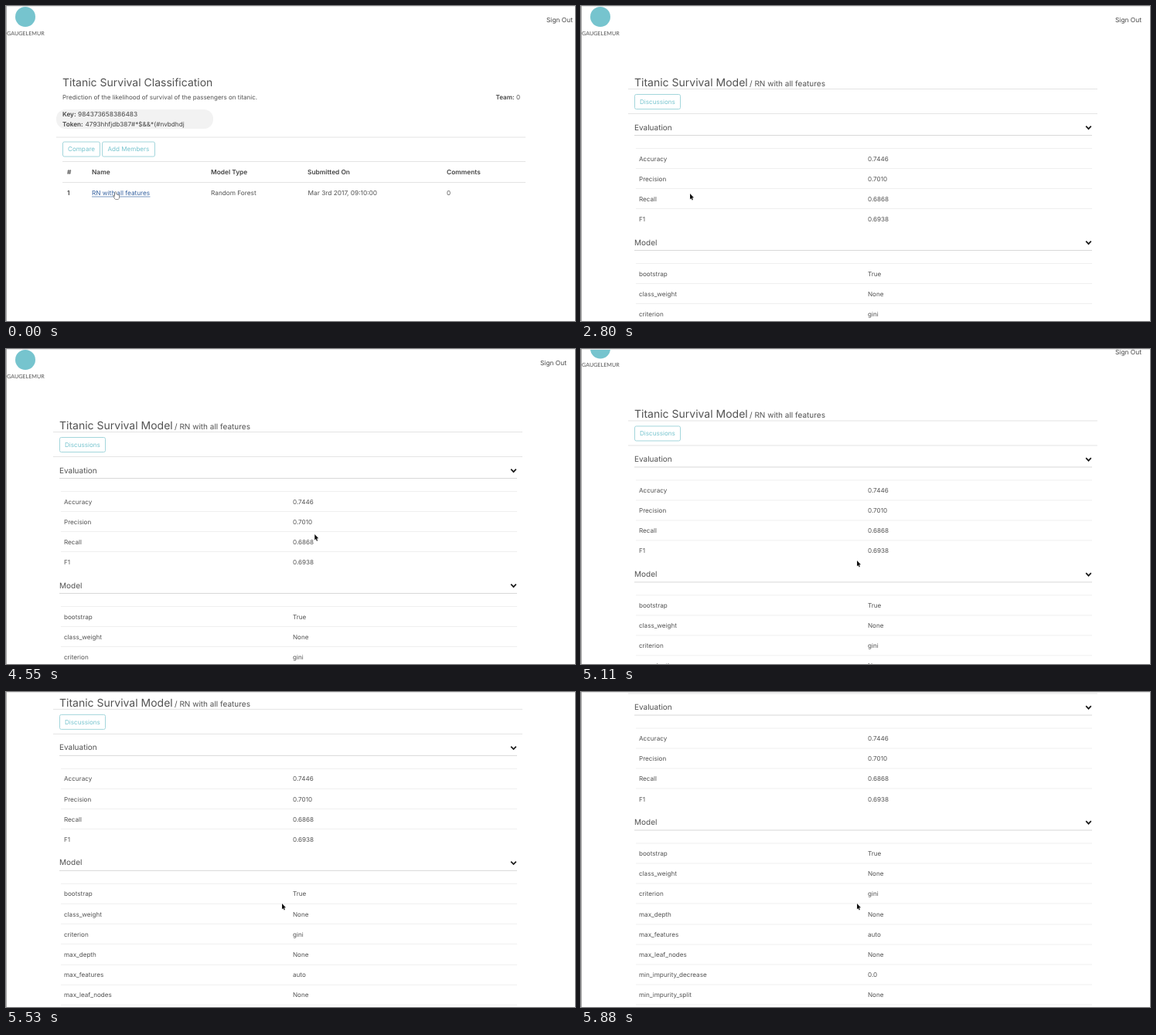
Recreate the animation shown at these times as an HTML page with a canvas. Size 736 by 408 pixels, loop 5.95 s.

```html
<!DOCTYPE html>
<html lang="en">
<head>
<meta charset="utf-8">
<title>Model tracker</title>
<style>
  html, body { margin: 0; width: 100%; height: 100%; overflow: hidden; background: #fff; }
  canvas { display: block; }
</style>
</head>
<body>
<canvas id="stage" width="736" height="408"></canvas>
<script>
const ctx = document.getElementById('stage').getContext('2d');
const LOOP = 5950, STEP = 70, PAGE_CHANGE = 2730;
const INK = '#525252', DARK = '#454545', TEAL = '#76c4ce', RULE = '#e4e4e4', FAINT = '#efefef';
const ROW = 26.13;

const METRICS = [['Accuracy', '0.7446'], ['Precision', '0.7010'], ['Recall', '0.6868'], ['F1', '0.6938']];
const PARAMS = [['bootstrap', 'True'], ['class_weight', 'None'], ['criterion', 'gini'],
  ['max_depth', 'None'], ['max_features', 'auto'], ['max_leaf_nodes', 'None'],
  ['min_impurity_decrease', '0.0'], ['min_impurity_split', 'None']];

const progress = (t, from, to) => Math.min(1, Math.max(0, (t - from) / (to - from)));
const mix = (a, b, k) => a + (b - a) * k;
const easeInOut = u => u < 0.5 ? 4 * u ** 3 : 1 - 4 * (1 - u) ** 3;
const easeOut = u => 1 - (1 - u) ** 2;
const bezier = (a, b, c, d, u) =>
  a * (1 - u) ** 3 + 3 * b * u * (1 - u) ** 2 + 3 * c * u * u * (1 - u) + d * u ** 3;

// Two flicks of the wheel
function scrollAt(t) {
  return 56.8 * easeInOut(progress(t, 4970, 5320)) + 80.7 * easeInOut(progress(t, 5418, 5670));
}

// A straight run up to the right, then a hook back down
function pointerAt(t) {
  if (t < 4340) {
    const k = easeInOut(progress(t, 3710, 4340));
    return [mix(141, 358, k), mix(243, 174, k)];
  }
  const u = easeOut(progress(t, 4340, 4970));
  return [bezier(358, 410, 417, 357, u), bezier(174, 170, 296, 274, u)];
}

// y is the middle of the capitals; returns the width
function text(str, x, y, size = 8.15, color = INK, weight = 400, family = 'Inter') {
  ctx.font = `${weight} ${size}px ${family}, sans-serif`;
  ctx.fillStyle = color;
  ctx.fillText(str, x, y + size * 0.36);
  return ctx.measureText(str).width;
}

// Letter by letter, so that the font does not swap in contextual symbols
function plainText(str, x, y, size, color) {
  for (const ch of str) x += text(ch, x, y, size, color);
}

const bold = (str, x, y, size = 8.35) => text(str, x, y, size, DARK, 600);

function rule(x0, x1, y, color = RULE) {
  ctx.fillStyle = color;
  ctx.fillRect(x0, y, x1 - x0, 1);
}

function button(label, x, y, w, textX) {
  ctx.beginPath();
  ctx.roundRect(x + 0.5, y + 0.5, w - 1, 19, 2);
  ctx.strokeStyle = '#a3d6dc';
  ctx.lineWidth = 1;
  ctx.stroke();
  text(label, textX, y + 10, 8.1, TEAL);
}

function polygon(points) {
  ctx.beginPath();
  points.forEach(([x, y]) => ctx.lineTo(x, y));
}

function header(signOutX) {
  ctx.fillStyle = TEAL;
  ctx.beginPath();
  ctx.arc(25, 14, 13, 0, Math.PI * 2);
  ctx.fill();
  text('GAUGELEMUR', 1, 35, 7.15, INK, 400, 'Lato');
  text('Sign Out', signOutX, 18.3, 8.4, DARK);
}

function projectPage() {
  header(699);
  text('Titanic Survival Classification', 73, 99, 14);
  text('Prediction of the likelihood of survival of the passengers on titanic.', 73, 118.5, 8);
  bold('Team:', 633.5, 118.5, 8.1);
  text('0', 660, 118.5);

  ctx.fillStyle = '#f2f2f2';
  ctx.beginPath();
  ctx.roundRect(65, 134, 203, 25, 12);
  ctx.fill();
  bold('Key:', 73, 140, 8.2);
  text('984373658386483', 93, 140, 8.35, DARK);
  bold('Token:', 73, 153, 8.2);
  plainText('4793hhfjdb387#*$&&*(#nvbdhdj', 102.5, 153, 8.2, DARK);

  rule(65, 672, 169.5);
  button('Compare', 73, 175.5, 49, 80);
  button('Add Members', 124, 175.5, 69, 131.5);

  rule(73, 672, 201);
  rule(73, 672, 228);
  const columns = [['#', 79], ['Name', 111], ['Model Type', 265], ['Submitted On', 390], ['Comments', 570]];
  columns.forEach(([label, x]) => bold(label, x, 215.3));
  bold('1', 79, 241.8);
  text('RN with all features', 111, 241.8, 8.22, '#34619f');
  rule(111, 186.5, 246.5, '#7898c0');
  text('Random Forest', 265, 241.8, 8.25);
  text('Mar 3rd 2017, 09:10:00', 390.5, 241.8, 8.32);
  text('0', 570, 241.8);
}

function section(title, y, rows) {
  text(title, 69, y, 10);
  polygon([[653.2, y - 1.3], [656.5, y + 2.2], [659.8, y - 1.3]]);
  ctx.strokeStyle = '#1a1a1a';
  ctx.lineWidth = 1.7;
  ctx.stroke();
  rule(69, 661, y + 10, '#d8d8d8');
  rows.forEach(([name, value], i) => {
    const rowY = y + 40.7 + i * ROW;
    rule(71, 661, Math.round(y + 27 + i * ROW), FAINT);
    text(name, 75, rowY, 8.1);
    text(value, 371, rowY, 8.1);
  });
}

function modelPage(scroll) {
  ctx.save();
  ctx.translate(0, -scroll);
  header(691);
  text('Titanic Survival Model', 69, 99, 14);
  text('/ RN with all features', 218, 100.3, 10);
  rule(61, 668, 107);
  button('Discussions', 69, 114, 60, 76);
  rule(61, 668, 139);
  section('Evaluation', 157, METRICS);
  section('Model', 306, PARAMS);
  rule(71, 661, 542, FAINT);
  ctx.restore();
}

function cursor([x, y], points, fill, stroke) {
  ctx.save();
  ctx.translate(x, y);
  polygon(points);
  ctx.closePath();
  ctx.lineJoin = 'round';
  ctx.lineWidth = 1;
  ctx.strokeStyle = stroke;
  ctx.stroke();
  ctx.fillStyle = fill;
  ctx.fill();
  ctx.restore();
}

const ARROW = [[0, 0], [0, 7.4], [1.6, 6], [2.7, 8.6], [3.9, 8.1], [2.8, 5.5], [5, 5.3]];
const HAND = [[-0.7, 0], [0.6, 0], [0.8, 3], [4.4, 4], [4.7, 6], [3.8, 9],
  [-0.6, 9], [-3, 4.6], [-0.8, 5.8]];

function draw(now) {
  const t = Math.floor((now % LOOP) / STEP) * STEP;
  ctx.fillStyle = '#fff';
  ctx.fillRect(0, 0, 736, 408);
  if (t < PAGE_CHANGE) {
    projectPage();
    cursor([mix(141.8, 141, progress(t, 1680, 1820)), 241], HAND, '#fff', '#333');
  } else {
    modelPage(scrollAt(t));
    cursor(pointerAt(t), ARROW, '#111', '#fff');
  }
  rule(0, 736, 0, '#e6e6e6');
  ctx.fillStyle = '#a8a8a8';
  ctx.fillRect(0, 0, 1, 408);
}

ctx.textRendering = 'geometricPrecision';
let start;
function tick(now) {
  start ??= now;
  draw(Math.max(0, now - start));
  requestAnimationFrame(tick);
}
draw(0);
requestAnimationFrame(tick);
</script>
</body>
</html>
```
